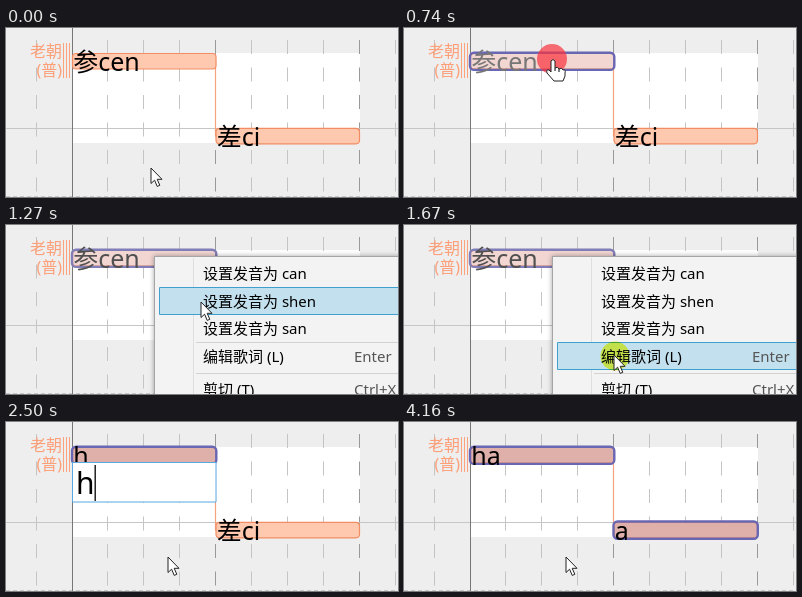
Animation of 392x169 px, one loop 5430 ms. Source, as an HTML page with a canvas:

```html
<!DOCTYPE html>
<html lang="zh-CN">
<head>
<meta charset="utf-8">
<style>
html, body { margin: 0; width: 100%; height: 100%; overflow: hidden; background: #eee; }
canvas { display: block; width: 392px; height: 169px; }
</style>
</head>
<body>
<canvas id="stage"></canvas>
<script>
const W = 392, H = 169, LOOP = 5430;
const FONT = '"Noto Sans", "Noto Sans CJK SC", sans-serif';
const canvas = document.getElementById('stage');
const g = canvas.getContext('2d');
const ratio = window.devicePixelRatio || 1;
canvas.width = W * ratio;
canvas.height = H * ratio;

// time, x, y of the pointer tip
const PATH = [
  [0, 145, 140], [60, 145, 140], [540, 149, 31], [940, 149, 31],
  [1270, 195, 77], [1340, 197, 84], [1600, 210, 130], [1810, 210, 130],
  [2000, 162, 135], [LOOP, 162, 135]
];
const MENU = [
  ['设置发音为 can', 49, ''], ['设置发音为 shen', 77, ''], ['设置发音为 san', 104, ''],
  ['编辑歌词 (L)', 132, 'Enter'], ['剪切 (T)', 165, 'Ctrl+X']
];

const clamp = v => Math.max(0, Math.min(1, v));
const between = (t, a, b) => t >= a && t < b;

function pointer(t) {
  const i = PATH.findIndex(p => p[0] > t);
  const [t0, x0, y0] = PATH[i - 1], [t1, x1, y1] = PATH[i];
  const k = (t - t0) / (t1 - t0), e = k * k * (3 - 2 * k);
  return [x0 + (x1 - x0) * e, y0 + (y1 - y0) * e];
}

function rect(x, y, w, h, color) {
  g.fillStyle = color;
  g.fillRect(x, y, w, h);
}

function line(x0, y0, x1, y1, color, width = 1, dash = [], offset = 0) {
  g.strokeStyle = color;
  g.lineWidth = width;
  g.setLineDash(dash);
  g.lineDashOffset = offset;
  g.beginPath();
  g.moveTo(x0, y0);
  g.lineTo(x1, y1);
  g.stroke();
  g.setLineDash([]);
}

function text(s, x, y, size, color = '#000', align = 'left') {
  g.font = `${size}px ${FONT}`;
  g.textAlign = align;
  g.fillStyle = color;
  g.fillText(s, x, y);
}

function box(x, y, w, h, r, fill, stroke, width) {
  g.beginPath();
  g.roundRect(x, y, w, h, r);
  g.fillStyle = fill;
  g.fill();
  g.strokeStyle = stroke;
  g.lineWidth = width;
  g.stroke();
}

function dot(x, y, r, color) {
  g.fillStyle = color;
  g.beginPath();
  g.arc(x, y, r, 0, 7);
  g.fill();
}

function shape(x, y, d) {
  const p = new Path2D(d);
  g.save();
  g.translate(x, y);
  g.fillStyle = '#fff';
  g.strokeStyle = '#222';
  g.lineWidth = 1;
  g.lineJoin = 'round';
  g.fill(p);
  g.stroke(p);
  g.restore();
}

function grid() {
  rect(0, 0, W, H, '#eee');
  rect(67, 25, 287, 90, '#fff');
  for (let i = -1; i < 10; i++) {
    const bar = i === 4 || i === 8, x = Math.floor(66 + i * 35.9) + 0.5;
    if (i) line(x, 0, x, H, bar ? '#999' : '#c4c4c4', 1, [14, 13.5], 15.5);
  }
  line(0, 100.5, W, 100.5, '#c6c6c6');
  line(0, 168.5, W, 168.5, '#c8c8c8', 1, [4, 3]);
  line(66.5, 0, 66.5, H, '#777');
  for (const x of [57.5, 60.5, 63.5]) line(x, 15, x, 50, '#fda27a');
  text('老朝', 56, 29, 16, '#fd9f78', 'right');
  text('(普)', 56, 48, 16, '#fd9f78', 'right');
}

function note(x, y, label, ring, fill, ink = '#000') {
  box(x, y, 143.5, 15.5, 3.5, fill, '#f28d63', 1.2);
  if (ring) box(x - 0.5, y - 0.8, 144.3, 17.2, 4, 'transparent', ring, 2.4);
  text(label, x + 0.7, y + 17.5, 25, ink);
}

function menu(t) {
  g.save();
  g.globalAlpha = clamp((t - 860) / 130);
  g.shadowColor = 'rgba(0,0,0,.35)';
  g.shadowBlur = 5;
  rect(148, 31, 270, 180, '#f3f3f3');
  g.shadowColor = 'transparent';
  g.strokeStyle = '#a5a5a5';
  g.lineWidth = 1;
  g.strokeRect(148.5, 31.5, 270, 180);
  line(187.5, 33, 187.5, H, '#dedede');
  for (const y of [117.5, 148.5]) line(190, y, W, y, '#d2d2d2');
  const [px, py] = pointer(t);
  const row = px > 153 ? MENU.findIndex(m => Math.abs(m[1] - py) <= 14) : -1;
  if (row >= 0) box(153.5, MENU[row][1] - 14.5, 260, 27, 0, '#c3e0ee', '#3fa0d0', 1);
  for (const [label, y, key] of MENU) {
    text(label, 197, y + 5, 15);
    text(key, 348, y + 5, 15, '#555');
  }
  g.restore();
}

function editor(t) {
  g.save();
  g.globalAlpha = t < 2000 ? clamp((t - 1800) / 130) : t < 4030 ? 1 : 0.5;
  box(66.5, 40.5, 143.5, 39.5, 0, '#fff', '#58a8e2', 1);
  if (t < 2500) {
    rect(70, 43, 81, 36, '#0078d7');
    text('参 差', 70, 73, 32, '#fff');
  } else {
    const typed = 'ha a'.slice(0, 1 + Math.min(3, Math.floor((t - 2500) / 330)));
    text(typed, 70, 72, 30);
    rect(70 + g.measureText(typed).width, 43, 1.3, 36, '#000');
  }
  g.restore();
}

function cursor(t, x, y) {
  if (between(t, 500, 960)) {
    shape(x, y, 'M-2 2 Q0-1 2 2 V9 Q5 7 6 10 Q9 8 10 11 Q13 10 12 14 V17 L10 22 H1 L-6 14 Q-7 10-4 11 L-2 13Z');
    line(x + 2, y + 9, x + 2, y + 12, '#000');
    line(x + 6, y + 10, x + 6, y + 13, '#000');
  } else {
    shape(x, y, 'M0 0 V15.5 L3.6 12.2 L6.2 18.4 L8.8 17.3 L6.2 11.3 H11Z');
  }
}

function draw(t) {
  g.setTransform(ratio, 0, 0, ratio, 0, 0);
  grid();

  const editing = t >= 1900, selected = t >= 670, hover = between(t, 490, 1900);
  const split = t >= 3490, violet = '#6967b4';
  line(209.5, 33, 209.5, 108, '#f5a27e', 1.2);
  const fill = editing ? '#deb0a9' : selected ? '#f1d6d2' : hover ? '#ffdccb' : '#ffc9af';
  const ink = !hover ? '#000' : t < 870 ? '#777' : '#505050';
  const ring = selected && (between(t, 870, 1900) ? '#817db8' : violet);
  note(66.5, 25.5, t < 2500 ? '参cen' : t < 2830 ? 'h' : 'ha', ring, fill, ink);
  note(210, 100.3, split ? 'a' : '差ci', split && violet, split ? '#deb0a9' : '#ffc9af');

  if (between(t, 860, 1810)) menu(t);
  if (between(t, 1810, 4160)) editor(t);

  const [x, y] = pointer(t);
  if (between(t, 670, 900)) dot(x - 1, y, 15, 'rgba(250,50,60,.7)');
  if (between(t, 1600, 1810)) {
    g.globalCompositeOperation = 'multiply';
    dot(x + 1, y + 1, 14.5, 'rgba(255,255,60,.9)');
    g.globalCompositeOperation = 'source-over';
  }
  cursor(t, x, y);
}

const start = performance.now();
function tick() {
  draw((performance.now() - start) % LOOP);
  requestAnimationFrame(tick);
}
tick();
</script>
</body>
</html>
```
